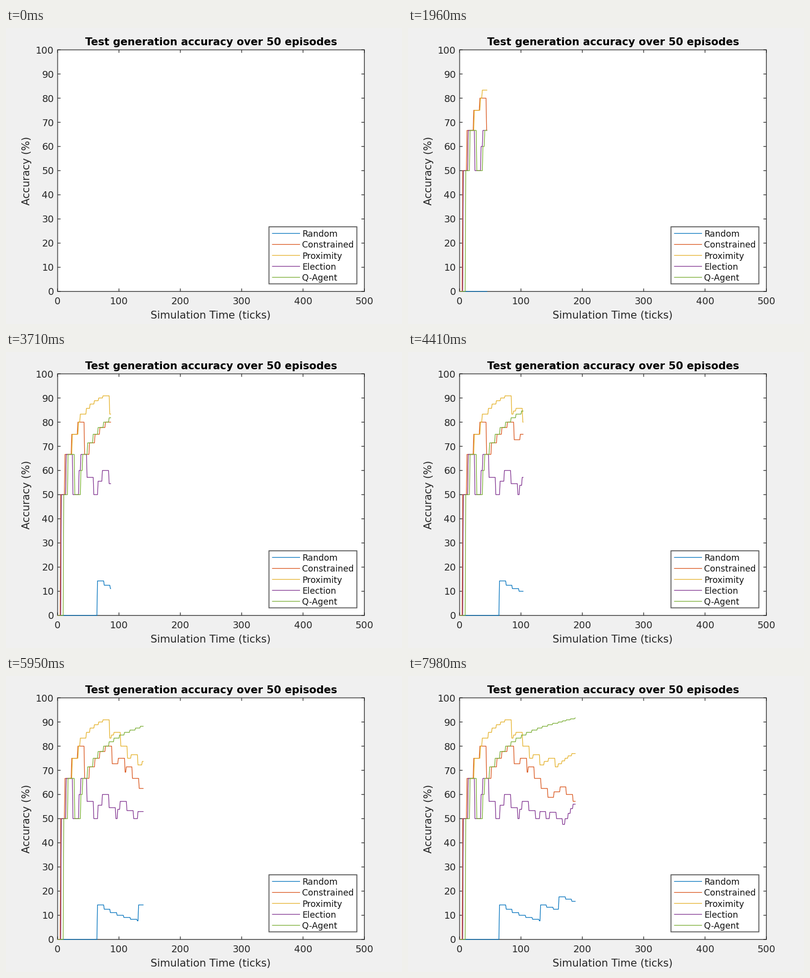
A matplotlib script that plays this animation: 800x600 px, repeating every 8000 ms.

```python
import matplotlib.pyplot as plt
import numpy as np
from matplotlib.animation import FuncAnimation
from matplotlib.patches import Rectangle

W, H, DPI = 800, 600, 100
LEFT, RIGHT, TOP, BOTTOM = 104.3, 724.0, 44.3, 534.0
INTERVAL, FRAMES = 20, 400
STEP_MS = 70
TICKS_PER_STEP = 5 / 3
LAST_TICK = 200
TIMEOUT = 10.8  # a failed test always runs this many ticks
INK, EDGE = "#262626", "#5C5C5C"
LINE_PX = 1.35

# Each phase: passed tests, ticks per passed test, failed tests that follow.
SERIES = [
    ("Random", "#0072BD",
     [(0, 0, 5), (1, 11.2, 6), (1, 2, 2), (1, 8.6, 2)]),
    ("Constrained", "#D95319",
     [(1, 5.4, 0), (1, 7, 0), (2, 10.6, 1), (4, 8.5, 1), (1, 10, 1),
      (1, 2, 3), (2, 9.8, 2)]),
    ("Proximity", "#E4B026",
     [(1, 6.2, 0), (1, 8, 0), (2, 9.9, 0), (1, 3, 0), (1, 10, 0),
      (4, 6.8, 1), (2, 3.8, 2), (1, 6.2, 1), (2, 7.2, 1), (5, 5.35, 0)]),
    ("Election", "#7E2F8E",
     [(1, 6.2, 0), (1, 8, 1), (1, 10, 0), (1, 3, 2), (2, 7, 2),
      (2, 3.6, 2), (1, 7, 1), (1, 5.4, 2), (4, 4.1, 0)]),
    ("Q-Agent", "#77AC30",
     [(1, 10.2, 0), (1, 7, 1), (1, 10, 0), (1, 3, 0), (14, 8.6, 0),
      (4, 6.7, 0)]),
]

plt.rcParams["font.family"] = "DejaVu Sans"


def pt(px):
    return px * 72 / DPI


def px_x(tick):
    return LEFT + (RIGHT - LEFT) * tick / 500


def px_y(value):
    return BOTTOM - (BOTTOM - TOP) * value / 100


def accuracy(phases):
    """Running pass rate in percent per tick, after one failed test at 0."""
    durations, passed = [0], [0]
    for wins, pace, losses in phases:
        durations += [pace] * wins + [TIMEOUT] * losses
        passed += [1] * wins + [0] * losses
    ends = np.floor(np.cumsum(durations) + 1e-6)
    rate = 100 * np.cumsum(passed) / np.arange(1, len(passed) + 1)
    return rate[np.searchsorted(ends, np.arange(LAST_TICK), "right") - 1]


fig = plt.figure(figsize=(W / DPI, H / DPI), dpi=DPI, facecolor="#F0F0F0")
ax = fig.add_axes([0, 0, 1, 1])
ax.set_xlim(0, W)
ax.set_ylim(H, 0)
ax.axis("off")


def stroke(xs, ys, color=INK, z=2):
    line, = ax.plot(xs, ys, color=color, lw=pt(LINE_PX), zorder=z, snap=False,
                    solid_capstyle="butt", solid_joinstyle="round")
    return line


def box(x0, y0, x1, y1, z):
    ax.add_patch(Rectangle((x0, y0), x1 - x0, y1 - y0, facecolor="white",
                           edgecolor=EDGE, lw=pt(1.9), zorder=z, snap=False))


def label(x, y, text, size, ha="center", color=INK, **kw):
    ax.text(x, y, text, fontsize=pt(size), ha=ha, va="baseline", color=color,
            zorder=7, **kw)


def draw_axes():
    box(LEFT, TOP, RIGHT, BOTTOM, 1)
    for tick in range(0, 501, 100):
        x = px_x(tick)
        stroke([x, x], [BOTTOM, BOTTOM - 6])
        stroke([x, x], [TOP, TOP + 6])
        label(x, 560, str(tick), 19.4)
    for value in range(0, 101, 10):
        y = px_y(value)
        stroke([LEFT, LEFT + 6], [y, y])
        stroke([RIGHT, RIGHT - 6], [y, y])
        label(97, y + 7.3, str(value), 19.4, ha="right")
    label(414, 34.7, "Test generation accuracy over 50 episodes", 21.1,
          color="black", weight="bold")
    label(413.5, 588.5, "Simulation Time (ticks)", 21.1)
    label(48.3, 289, "Accuracy (%)", 21.1, rotation=90,
          rotation_mode="anchor")


def draw_legend():
    box(531.3, 403, 708.8, 518.6, 5)
    for i, (name, color, _) in enumerate(SERIES):
        y = 416.4 + 22.25 * i
        stroke([537.5, 594], [y, y], color, 6)
        label(598, y + 6.6, name, 17.2, ha="left", color="#111111")


draw_axes()
draw_legend()
curve_x = px_x(np.arange(LAST_TICK))
curves = [(stroke([], [], color, 3), px_y(accuracy(phases)))
          for _, color, phases in SERIES]


def update(frame):
    step = int((frame + 0.5) * INTERVAL) // STEP_MS
    count = int(step * TICKS_PER_STEP + 1e-6)
    for line, ys in curves:
        line.set_data(curve_x[:count], ys[:count])
    return [line for line, _ in curves]


anim = FuncAnimation(fig, update, frames=FRAMES, interval=INTERVAL,
                     init_func=lambda: update(0), repeat=True,
                     repeat_delay=0, blit=False)
plt.show()
```
